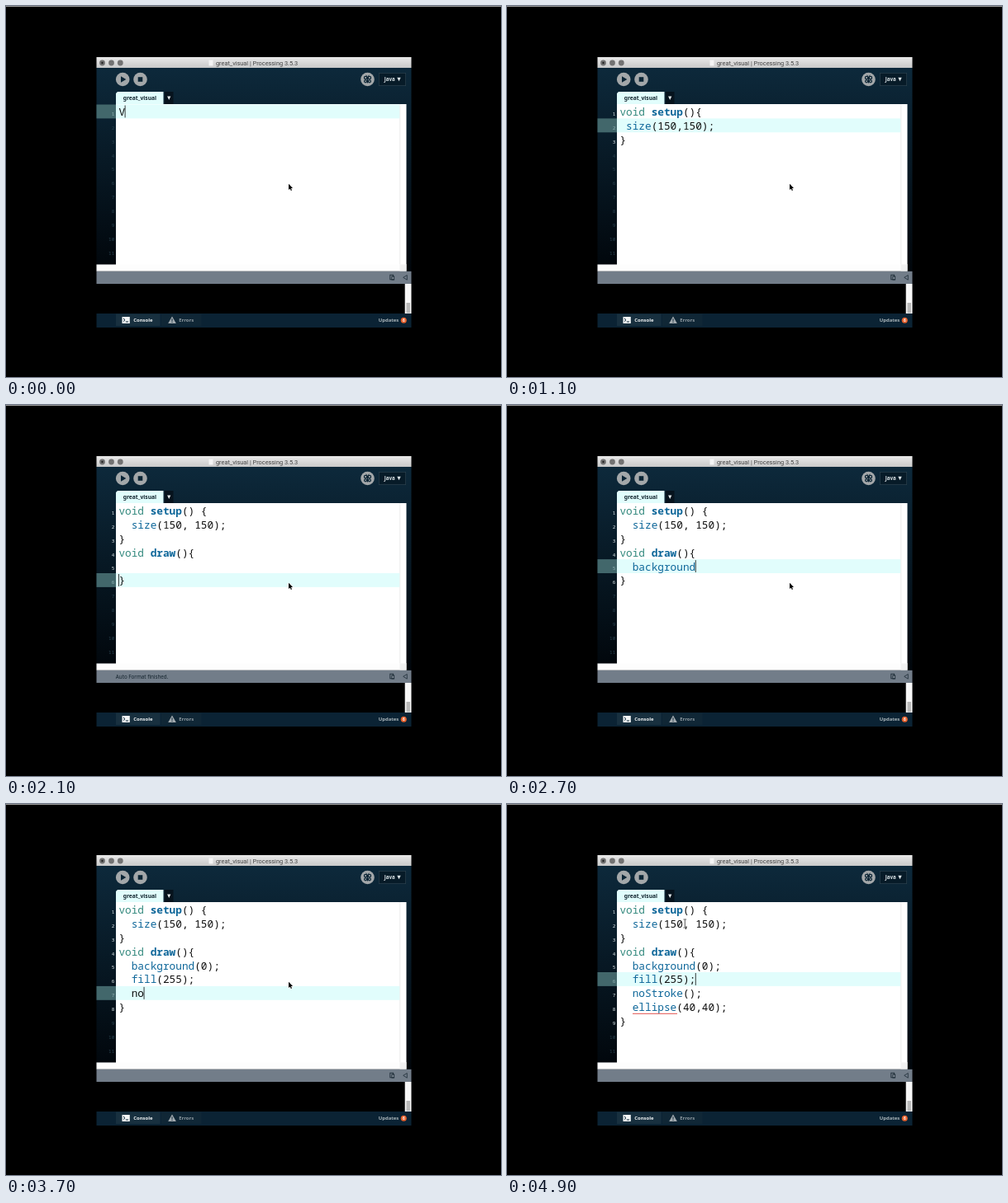
Write an HTML page with a canvas that moves like this. It is 599 by 450 pixels and loops after 5 s.

```html
<!DOCTYPE html>
<html lang="en">
<head>
<meta charset="utf-8">
<title>Typing a sketch</title>
<style>
  html, body { margin: 0; width: 100%; height: 100%; overflow: hidden; background: #000; }
  canvas { display: block; }
</style>
</head>
<body>
<canvas id="stage" width="599" height="450"></canvas>
<script>
const ctx = document.getElementById('stage').getContext('2d');
const STEP = 100, LEFT = 136.4, TOP = 119.5, ROW = 16.9, CHAR = 7.65;
const MONO = '12.75px "Noto Sans Mono", monospace';
const SANS = '"Noto Sans", "Open Sans", sans-serif';
const PALE = '#e1fdfc', INK = '#0b2535';

// Each part is one step of typing; "|" marks the caret (default: after the part).
const type = (before, after, ...parts) =>
  parts.map(p => before + (p.includes('|') ? p : p + '|') + after);

const setup = 'void setup() {\n  size(150, 150);\n}\n';
const draw = setup + 'void draw(){\n';
const bg = draw + '  background(0);\n';
const fill = bg + '  fill(255);\n';
const stroke = fill + '  noStroke();\n';
const done = '  noStroke();\n  ellipse(40,40);\n}';

const steps = [
  ...type('', '', 'V', 'v', 'void', 'void s', 'void set', 'void setup(', 'void setup(){'),
  ...type('void setup(){\n', '', '', '\n}'),
  ...type('void setup(){\n', '\n}', ' si', ' size(150', ' size(150,150);', ' size(150,150);'),
  'void setup(){\n size(150,150);\n}|',
  ...type('', '', setup.trimEnd()),
  ...type(setup, '', '', 'void', 'void dr', 'void draw(', 'void draw(){'),
  ...type(draw, '', '\n}', '\n|}'),
  ...type(draw, '\n}', '  ', '  b', '  bac', '  back', '  backgro', '  background',
    '  background(', '  background(0', '  background(0);'),
  ...type(bg, '\n}', '  ', '  f', '  fill', '  fill(2', '  fill(255);'),
  ...type(fill, '\n}', '  ', '  no', '  noStr', '  noStroke', '  noStroke();'),
  ...type(stroke, '\n}', '  ', '  ell', '  ellipse()|;', '  ellipse(|);',
    '  ellipse(40|);', '  ellipse(40,40|);', '  ellipse(40,40|);'),
  ...type(bg, '\n' + done, '  fill(255);', '  fill(255);')
];

function box(x, y, w, h, color) {
  ctx.fillStyle = color;
  ctx.fillRect(x, y, w, h);
}

function disc(x, y, r, color) {
  ctx.fillStyle = color;
  ctx.beginPath();
  ctx.arc(x, y, r, 0, 7);
  ctx.fill();
}

function poly(color, ...pts) {
  ctx.beginPath();
  for (let i = 0; i < pts.length; i += 2) ctx.lineTo(pts[i], pts[i + 1]);
  ctx.closePath();
  ctx.fillStyle = color;
  ctx.fill();
}

function line(color, width, ...pts) {
  ctx.beginPath();
  for (let i = 0; i < pts.length; i += 2) ctx.lineTo(pts[i], pts[i + 1]);
  ctx.strokeStyle = color;
  ctx.lineWidth = width;
  ctx.stroke();
}

function text(s, x, y, font, color, align = 'left') {
  ctx.font = font;
  ctx.fillStyle = color;
  ctx.textAlign = align;
  ctx.fillText(s, x, y);
}

const bold = size => `bold ${size}px ${SANS}`;

function shade(x, y, w, h, from, to) {
  const g = ctx.createLinearGradient(0, y, 0, y + h);
  g.addColorStop(0, from);
  g.addColorStop(1, to);
  box(x, y, w, h, g);
}

function titleBar() {
  shade(109.5, 62, 381, 13, '#e9e9e9', '#c9c9c9');
  for (const x of [116.5, 127.5, 138.3]) disc(x, 69, 3.4, '#727272');
  disc(116.5, 69, 1.2, '#222');
  box(245.5, 65.5, 5, 7, '#f4f4f4');
  text('great_visual | Processing 3.5.3', 254, 71.8, '7.35px Roboto, sans-serif', '#454545');
}

function toolbar() {
  shade(109.5, 75, 381, 247, '#0d293b', '#01060b');
  for (const x of [141.2, 162.5, 437.5]) disc(x, 89, 8.3, '#a3a7a9');
  poly(INK, 139, 85.3, 145.3, 89, 139, 92.7);
  box(159.7, 86.2, 5.6, 5.6, INK);
  for (const side of [-1, 1]) {
    const x = 437.5 + side * 2.4;
    ctx.strokeStyle = INK;
    ctx.lineWidth = 1.2;
    for (const [y, r] of [[87, 1.7], [91.3, 1.5]]) {
      ctx.beginPath();
      ctx.arc(x, y, r, 0, 7);
      ctx.stroke();
    }
    line(INK, 0.9, 437.5, 86.5, 437.5 + side * 1.8, 83.8);
  }
  line(INK, 1.2, 437.5, 86, 437.5, 93.5);

  box(451, 81, 33, 16, '#2b414e');
  box(451.7, 81.7, 31.6, 14.6, '#071b28');
  text('Java', 457.8, 91.3, bold(6.2), '#dbe3e6');
  poly('#dbe3e6', 473.3, 86.8, 477.7, 86.8, 475.5, 91.2);

  poly(PALE, 133, 106, 135, 104, 190.5, 104, 190.5, 119.5, 133, 119.5);
  text('great_visual', 141.7, 113.7, bold(6.7), '#12252f');
  box(192, 104, 10.5, 15, '#06131d');
  poly('#e4eaec', 195.1, 109.5, 199.3, 109.5, 197.2, 114);
}

function panels(message) {
  box(133, 119, 351.5, 195, '#fff');
  box(476.3, 119, 1, 195, '#ececec');
  box(109.5, 313.5, 375, 8.3, '#fdfdfd');
  box(476.5, 313.5, 8, 8.3, '#f1f1f1');

  box(109.5, 321.8, 381, 15.2, '#727d89');
  if (message) text('Auto Format finished.', 132.8, 332, `6.25px ${SANS}`, '#14232d');
  ctx.strokeStyle = '#1d2c37';
  ctx.lineWidth = 0.9;
  ctx.strokeRect(464.8, 326.2, 3.8, 5.6);
  box(466.5, 327.5, 3.6, 5, '#1d2c37');
  box(467.4, 328.6, 1.8, 2.6, '#8a949e');
  line('#1d2c37', 0.8, 485.3, 326.5, 480.7, 329.3, 485.3, 332.2, 485.3, 326.5);

  box(109.5, 337, 381, 36, '#000');
  box(482.7, 337, 7.8, 36, '#f8f8f8');
  box(484.4, 360, 4.6, 12.5, '#b9b9b9');

  box(109.5, 373, 381, 17, '#0b2334');
  box(133, 373.5, 53.7, 14.5, '#18303f');
  box(187.7, 373.5, 48.8, 14.5, '#102736');
  box(140.5, 377, 9.3, 8, '#f2f5f6');
  line(INK, 1, 142, 379, 144, 380.8, 142, 382.6);
  line(INK, 1, 144.8, 383, 148, 383);
  text('Console', 154.3, 383.2, bold(5.9), '#f2f5f6');
  poly('#a3abb0', 201, 376.6, 205.8, 385, 196.2, 385);
  box(200.5, 379.3, 1, 3, INK);
  box(200.5, 383, 1, 1, INK);
  text('Errors', 209.3, 383.2, bold(5.9), '#929da4');
  text('Updates', 450.8, 383.2, bold(5.9), '#aab5ba');
  disc(481.3, 381.2, 3.5, '#e5602c');
  text('6', 481.3, 383, bold(4.8), '#fff', 'center');
}

function codeLine(s, y) {
  const word = /[A-Za-z]+|[^A-Za-z\s]+/g;
  for (const m of s.matchAll(word)) {
    const w = m[0];
    const main = /^(setup|draw)$/.test(w);
    const call = /^(size|background|fill|noStroke|ellipse)$/.test(w);
    const color = w === 'void' ? '#33897e' : main || call ? '#0d6699' : '#111';
    text(w, LEFT + m.index * CHAR, y, (main ? 'bold ' : '') + MONO, color);
  }
}

function editor(i) {
  const [head] = steps[i].split('|');
  const lines = steps[i].replace('|', '').split('\n');
  const row = head.split('\n').length - 1;
  const col = head.length - head.lastIndexOf('\n') - 1;
  const y = TOP + row * ROW;

  box(109.5, y, 23.5, ROW, '#42676b');
  box(133, y, 343.3, ROW, PALE);
  for (let n = 0; n < 11; n++) {
    const color = n === row ? '#8fb2b3' : n < lines.length ? '#dfe8ea' : '#2b4350';
    text(n + 1, 131.3, TOP + n * ROW + 13.3, '6px "Noto Sans Mono", monospace', color, 'right');
  }
  lines.forEach((s, n) => codeLine(s, TOP + n * ROW + 13.4));

  const cur = lines[row];
  if (cur[col - 1] === ')') {
    ctx.strokeStyle = '#6fa5a8';
    ctx.lineWidth = 0.8;
    ctx.strokeRect(LEFT + cur.lastIndexOf('(', col) * CHAR, y + 1.5, CHAR, ROW - 3);
  }
  if (i >= 47) line('#e2504e', 1, 152, 254.3, 206, 254.3);
  if (i !== 11) box(LEFT + col * CHAR - 0.4, y + 1, 0.9, ROW - 2, '#222');
}

function pointer(i) {
  if (i < 47) {
    const p = [342, 215.8, 342, 223, 343.7, 221.6, 344.8, 224, 346, 223.4, 344.9, 221.1, 347, 221];
    line('#fff', 1.2, ...p, p[0], p[1]);
    poly('#000', ...p);
    return;
  }
  const [x, y] = [[252, 214], [229, 213], [215.3, 145]][i - 47];
  line('#444', 0.9, x, y - 4.5, x, y + 4.5);
  for (const d of [-5, 5]) line('#444', 0.9, x - 1.8, y + d, x + 1.8, y + d);
}

function frame(now) {
  const i = Math.floor(now / STEP) % steps.length;
  box(0, 0, 599, 450, '#000');
  box(0, 0, 599, 1, '#999');
  toolbar();
  titleBar();
  panels(i >= 14 && i < 23);
  editor(i);
  pointer(i);
  requestAnimationFrame(() => frame(performance.now() - start));
}

const start = performance.now();
frame(0);
</script>
</body>
</html>
```
